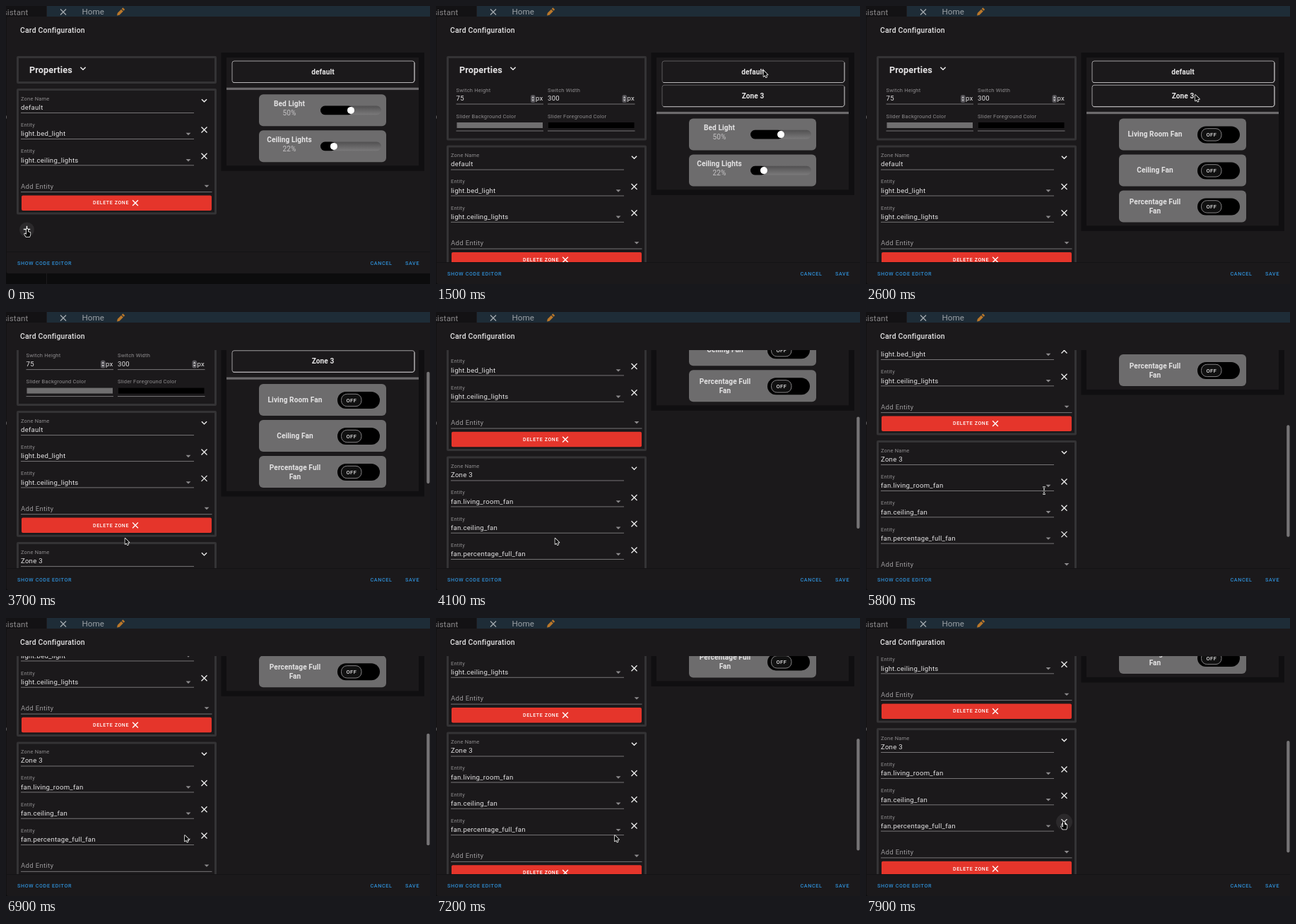
Write an HTML page with a canvas that moves like this. It is 600 px wide and 394 px high and loops after 8 s.

```html
<!DOCTYPE html>
<html lang="en">
<head>
<meta charset="utf-8">
<title>Card Configuration</title>
<style>
html, body { margin: 0; width: 100%; height: 100%; overflow: hidden; background: #1b191b; }
canvas { display: block; width: 600px; height: 394px; }
</style>
</head>
<body>
<canvas id="stage"></canvas>
<script>
const W = 600, H = 394, LOOP = 8000;
const FONT = 'Roboto, Arial, sans-serif';
const BG = '#1b191b', EDGE = '#343335', GREY = '#6d6c6d', TEXT = '#e4e3e4', DIM = '#8f8d8f';
const ratio = Math.max(1, window.devicePixelRatio || 1);

const newLayer = canvas => {
  canvas.width = W * ratio;
  canvas.height = H * ratio;
  const g = canvas.getContext('2d');
  g.scale(ratio, ratio);
  return g;
};
const screen = newLayer(document.getElementById('stage'));
const overlay = newLayer(document.createElement('canvas'));
let c = screen;

// Keyframes are [time, value, value...]
const SCROLL = [[3500, 0], [3600, 20], [3700, 57], [3800, 100], [3900, 135], [4000, 161],
  [4100, 179], [4200, 187], [4300, 190], [4650, 190], [4800, 195], [5100, 201.5],
  [6800, 201.5], [6900, 208], [7000, 214.5], [7100, 219], [7200, 222], [7400, 225.5], [7700, 227.5]];
const POINTER = [[1150, 425, 215], [1350, 455, 130], [1500, 463.5, 91.5], [1700, 464, 96],
  [2000, 466, 126], [2850, 466, 126], [3000, 360, 200], [3150, 225, 292], [3300, 168.5, 320.7],
  [5450, 168.5, 320.7], [5600, 205, 288], [5800, 252, 253], [6000, 255, 272], [6300, 253, 298],
  [6500, 253, 308], [7720, 253, 308], [7800, 270, 299], [7900, 280, 291.5]];
const BAR = [[3500, 0], [3600, 1], [5900, 1], [6250, 0], [6800, 0], [6900, 1]];

function at(keys, t) {
  if (t <= keys[0][0]) return keys[0].slice(1);
  for (let i = 1; i < keys.length; i++) {
    const a = keys[i - 1], b = keys[i];
    if (t < b[0]) {
      const k = (t - a[0]) / (b[0] - a[0]);
      return a.slice(1).map((v, j) => v + (b[j + 1] - v) * k);
    }
  }
  return keys[keys.length - 1].slice(1);
}

function rect(x, y, w, h, color) {
  c.fillStyle = color;
  c.fillRect(x, y, w, h);
}

function round(x, y, w, h, r, fill, stroke, width = 1) {
  c.beginPath();
  c.roundRect(x, y, w, h, r);
  if (fill) { c.fillStyle = fill; c.fill(); }
  if (stroke) { c.strokeStyle = stroke; c.lineWidth = width; c.stroke(); }
}

function disc(x, y, r, color) {
  c.beginPath();
  c.arc(x, y, r, 0, 7);
  c.fillStyle = color;
  c.fill();
}

// y is the middle of the capital letters
function text(str, x, y, size, { color = TEXT, weight = 400, align = 'left', gap = 0.1 } = {}) {
  c.font = `${weight} ${size}px ${FONT}`;
  c.letterSpacing = gap + 'px';
  c.textAlign = align;
  c.fillStyle = color;
  c.fillText(str, x, y + size * 0.355);
}

function line(points, color, width) {
  c.beginPath();
  points.forEach(([x, y], i) => i ? c.lineTo(x, y) : c.moveTo(x, y));
  c.strokeStyle = color;
  c.lineWidth = width;
  c.stroke();
}

function shape(points, fill) {
  c.beginPath();
  points.forEach(([x, y]) => c.lineTo(x, y));
  c.closePath();
  c.fillStyle = fill;
  c.fill();
}

function cross(x, y, r = 4, color = '#f0f0f0', width = 1.3) {
  line([[x - r, y - r], [x + r, y + r]], color, width);
  line([[x + r, y - r], [x - r, y + r]], color, width);
}

const chevron = (x, y) =>
  line([[x - 3.6, y - 1.8], [x, y + 1.8], [x + 3.6, y - 1.8]], '#f0f0f0', 1.4);
const caret = (x, y) => shape([[x - 3.4, y - 1.7], [x + 3.4, y - 1.7], [x, y + 1.7]], '#8c8a8c');
const underline = (x1, x2, y) => rect(x1, y, x2 - x1, 1, '#767476');
const panel = (y, h) => round(16.5, y + 1.5, 280, h - 3, 0.5, null, EDGE, 3);
const label = (str, x, y) => text(str, x, y, 7.5, { color: DIM, gap: 0.2 });
const value = (str, x, y) => text(str, x, y, 9.6, { gap: 0.25 });

function numberField(name, num, x) {
  label(name, x, 119);
  value(num, x, 131);
  round(x + 105.5, 126, 6.5, 11, 2.5, '#57555a');
  shape([[x + 107, 130.5], [x + 108.7, 128], [x + 110.4, 130.5]], '#d0d0d0');
  shape([[x + 107, 132.5], [x + 108.7, 135], [x + 110.4, 132.5]], '#d0d0d0');
  value('px', x + 112.5, 131);
  underline(x, x + 123.5, 138.5);
}

function colorField(name, color, x) {
  label(name, x, 156);
  rect(x + 1, 165, 121.5, 8, color);
  underline(x, x + 123.5, 176.5);
}

function properties(open) {
  panel(71, open ? 119.5 : 39);
  text('Properties', 33, 90, 12.7, { weight: 700 });
  chevron(109, 88.5);
  if (!open) return;
  numberField('Switch Height', '75', 28.5);
  numberField('Switch Width', '300', 158);
  colorField('Slider Background Color', '#706f70', 28.5);
  colorField('Slider Foreground Color', '#000', 158);
}

function zone(y, name, entities, hover) {
  const rows = entities.length * 37.3;
  panel(y, 104 + rows);
  label('Zone Name', 21, y + 14);
  value(name, 21, y + 26.3);
  underline(21, 266, y + 34);
  chevron(280.5, y + 17);
  entities.forEach((id, i) => {
    const top = y + i * 37.3;
    label('Entity', 21, top + 51.3);
    value(id, 21, top + 64);
    caret(258, top + 64.5);
    underline(21, 266, top + 71);
    if (hover === i) disc(280.5, top + 58.5, 11.5, '#2b292b');
    cross(280.5, top + 58.5);
  });
  const foot = y + rows;
  text('Add Entity', 21, foot + 63.5, 9.7, { color: '#9a989a', gap: 0.25 });
  caret(284, foot + 63.8);
  underline(21, 291.5, foot + 71.5);
  round(22, foot + 76.8, 269, 21.5, 2, '#e5352b');
  text('DELETE ZONE', 123, foot + 87.4, 7, { color: '#fff', weight: 500, gap: 0.62 });
  cross(183, foot + 87.6, 3.9, '#fff', 1.4);
}

function tab(name, y, raised) {
  round(320, y, 258, 30.5, 3, BG, raised ? '#5c5a5c' : '#a09ea0', 1);
  line([[321.5, y + 30.5], [575.5, y + 30.5], [578, y + 28], [578, y + 2]], '#b8b6b8', 1);
  text(name, 448.5, y + 15, 10.1, { weight: 700, align: 'center' });
}

function slider(percent, y) {
  const knob = 445 + 86 * percent / 100;
  const fill = c.createLinearGradient(0, y - 7, 0, y + 7);
  fill.addColorStop(0, '#4f4e4f');
  fill.addColorStop(0.5, '#666566');
  fill.addColorStop(1, '#7c7b7c');
  round(445, y - 6.3, 86, 12.6, 6.3, fill);
  round(445, y - 6.3, knob - 442, 12.6, 6.3, '#000');
  disc(knob, y, 5, '#fff');
}

function toggle(y) {
  round(469, y - 12, 60, 24, 12, '#000');
  round(474.5, y - 8.7, 28.5, 17.4, 8, '#111', '#858385', 1);
  text('OFF', 488.9, y, 7.5, { weight: 500, align: 'center', gap: 0.5 });
}

function preview(tabs, fans, raised) {
  const top = 83 + tabs.length * 34.2;
  const cards = fans ? 3 : 2;
  rect(304.5, 66, 287.5, top + cards * 51 - 51.5, '#100f11');
  rect(312, 73, 272, top + cards * 51 - 66, BG);
  tabs.forEach((name, i) => tab(name, 78 + i * 34.2, raised));
  rect(312, top - 1.5, 272, 3.2, '#6c6a6c');
  for (let i = 0; i < cards; i++) {
    const y = top + 8 + i * 51;
    round(358, y, 180, 45, 6, GREY);
    const head = (str, dy) => text(str, fans ? 409 : 401, y + dy, 10.1, { weight: 700, align: 'center' });
    if (!fans) {
      const level = [50, 22][i];
      head(['Bed Light', 'Ceiling Lights'][i], 13.5);
      text(level + '%', 401, y + 26.5, 10, { color: '#c4c2c4', align: 'center' });
      slider(level, y + 22.7);
    } else {
      if (i < 2) head(['Living Room Fan', 'Ceiling Fan'][i], 22.5);
      else { head('Percentage Full', 16.5); head('Fan', 29.5); }
      toggle(y + 23);
    }
  }
}

function backdrop() {
  rect(0, 0, W, H, '#0c0c0d');
  rect(58, 0, W, 16, '#1e2c37');
  rect(0, 0, 57, 16, '#131214');
  rect(57, 0, 1, H, '#1c1b1d');
  text('sistant', 31.5, 8.5, 11.6, { color: '#8b898b', align: 'right' });
  cross(81, 8.5, 4, '#a5abb0', 1.3);
  text('Home', 107.5, 7.5, 11.6, { color: '#9ba1a6' });
  c.save();
  c.translate(162, 8.5);
  c.rotate(-Math.PI / 4);
  shape([[-7, 0], [-4, -2], [3.4, -2], [3.4, 2], [-4, 2]], '#b9772a');
  rect(4.4, -2, 2.4, 4, '#b9772a');
  c.restore();
}

function dialog(bottom, body) {
  round(0.5, 15, 600, bottom - 15, [3, 0, 0, 3], BG);
  rect(0, 155.5, 1, 4, '#5a585a');
  text('Card Configuration', 20, 34.7, 10.4, { weight: 500, gap: 0.22 });
  c.save();
  c.beginPath();
  c.rect(0, 54, W, bottom - 85);
  c.clip();
  body();
  c.restore();
  rect(1, bottom - 31, W, 1, '#141315');
  const action = (str, x) => text(str, x, bottom - 14.7, 7.2, { color: '#2f8fd6', weight: 500, gap: 0.63 });
  action('SHOW CODE EDITOR', 16);
  action('CANCEL', 515.5);
  action('SAVE', 565);
}

function outlined(path) {
  c.lineJoin = 'round';
  c.strokeStyle = '#fff';
  c.lineWidth = 1.5;
  c.stroke(path);
  c.fillStyle = '#000';
  c.fill(path);
  c.lineJoin = 'miter';
}

const ARROW = new Path2D('M0 0V8.4L2 6.6L3.4 9.6L4.6 9L3.3 6.1H6Z');
const HAND = new Path2D('M-1 -2.5Q0 -3.6 1 -2.5V1L4.4 2V5L3.4 8H-1.6L-4 4.2L-3 3.4L-1 5Z');
const BEAM = new Path2D('M-2 -5Q0 -5 0 -4Q0 -5 2 -5M0 -4V4M-2 5Q0 5 0 4Q0 5 2 5M-1.3 1H1.3');

function pointer(kind, x, y) {
  c.save();
  c.translate(x, y);
  if (kind === 'beam') {
    c.strokeStyle = '#e8e8e8';
    c.lineWidth = 2;
    c.stroke(BEAM);
    c.strokeStyle = '#111';
    c.lineWidth = 0.8;
    c.stroke(BEAM);
  } else outlined(kind === 'hand' ? HAND : ARROW);
  c.restore();
}

function startScene() {
  backdrop();
  dialog(379, () => {
    properties(false);
    zone(117, 'default', ['light.bed_light', 'light.ceiling_lights']);
    preview(['default'], false, false);
    disc(29.5, 317, 10.5, '#2b292b');
    line([[24.8, 316.5], [34.2, 316.5]], '#f0f0f0', 1.5);
    line([[29.5, 311.8], [29.5, 321.2]], '#f0f0f0', 1.5);
  });
  pointer('hand', 30, 319);
}

function mainScene(t) {
  const [scroll] = at(SCROLL, t), [bar] = at(BAR, t), [x, y] = at(POINTER, t);
  const onButton = t >= 7800;
  backdrop();
  dialog(394, () => {
    c.save();
    c.translate(0, -scroll);
    properties(true);
    zone(197.5, 'default', ['light.bed_light', 'light.ceiling_lights']);
    zone(383.5, 'Zone 3', ['fan.living_room_fan', 'fan.ceiling_fan', 'fan.percentage_full_fan'],
      onButton ? 2 : -1);
    preview(['default', 'Zone 3'], t >= 2300, t < 2300);
    c.restore();
    c.globalAlpha = bar;
    round(595.3, 54.5 + scroll * 0.525, 4.2, 158.5, 2.1, '#777577');
    c.globalAlpha = 1;
  });
  const overField = t >= 5700 && t < 5950;
  pointer(onButton ? 'hand' : overField ? 'beam' : 'arrow', x, y);
}

function frame(now) {
  const t = now % LOOP;
  c = screen;
  if (t < 400) startScene();
  else mainScene(t);
  if (t >= 100 && t < 400) {
    c = overlay;
    mainScene(t);
    screen.globalAlpha = Math.floor(t / 100) / 4;
    screen.drawImage(overlay.canvas, 0, 0, W, H);
    screen.globalAlpha = 1;
  }
  requestAnimationFrame(frame);
}
requestAnimationFrame(frame);
</script>
</body>
</html>
```
